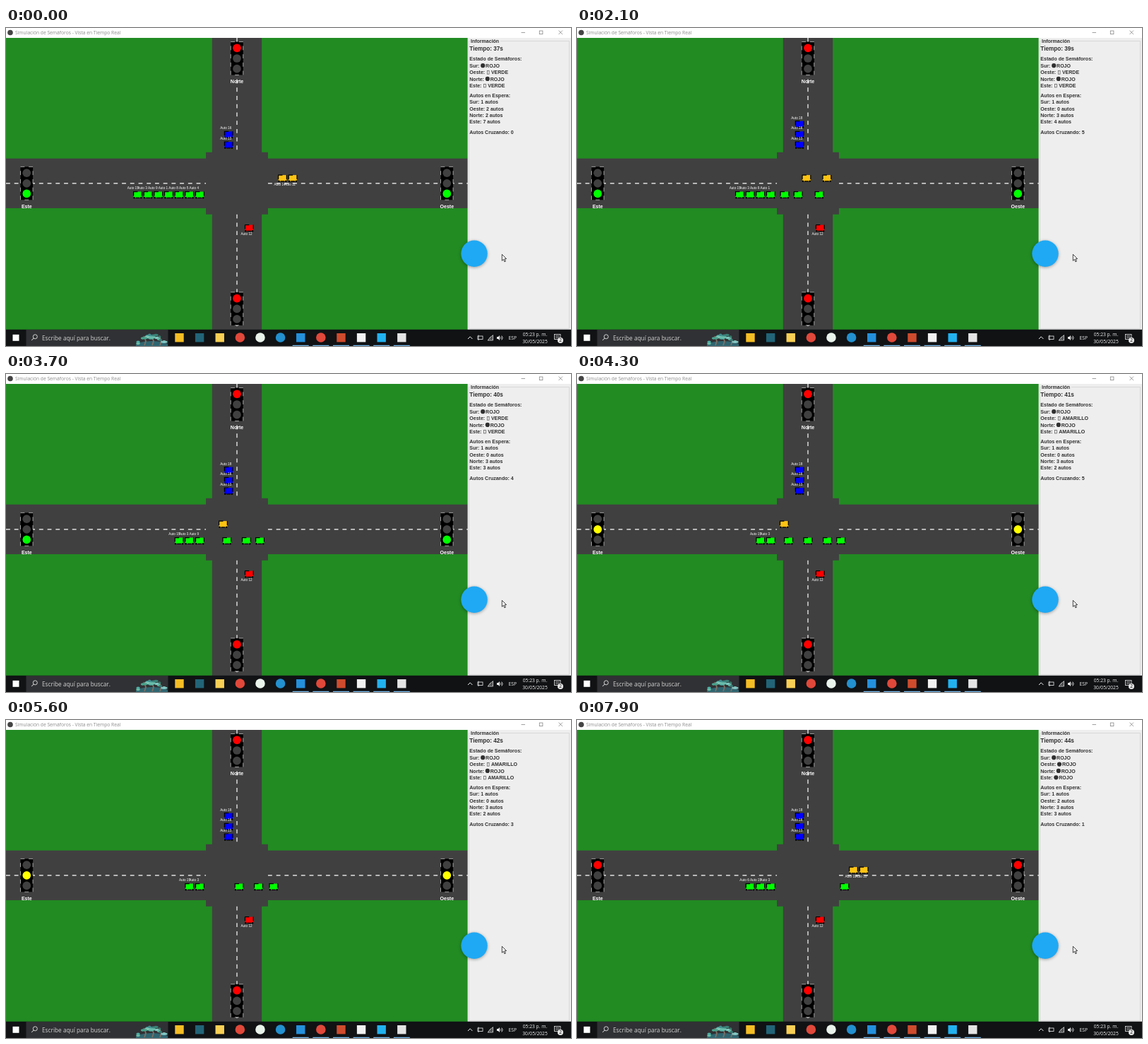
Write an HTML page with a canvas that moves like this. It is 800x450 px and loops after 8 s.

```html
<!DOCTYPE html>
<html lang="es">
<head>
<meta charset="utf-8">
<title>Simulación de Semáforos</title>
<style>
html, body { margin: 0; width: 100%; height: 100%; overflow: hidden; background: #fff; }
canvas { display: block; }
</style>
</head>
<body>
<canvas id="stage" width="800" height="450"></canvas>
<script>
const ctx = document.getElementById('stage').getContext('2d');
const LOOP = 8000, UNIT = 0.586, GAP = 25 * UNIT;
const TOP = 14, BOTTOM = 427, SIDE = 654, CX = 327, CY = 219.8;
const ROAD = 60 * UNIT, BOX = 75 * UNIT;
const SANS = '"Liberation Sans", Arial, sans-serif';
const UI = '"Open Sans", "Noto Sans", sans-serif';
const AMBER_AT = 4, RED_AT = 7.1;
const LAMP = { ROJO: '#f00', AMARILLO: '#ff0', VERDE: '#0f0' };

// x, y: front waiting place; dx, dy: step to the next car behind; lx, ly: label offset.
// ids and since: cars front first, later arrivals by second; leave: departure seconds.
const lanes = {
  Sur: { color: '#f00', x: 344.3, y: 283, dx: 0, dy: GAP, lx: -11.8, ly: 10.2, ids: [12] },
  Oeste: {
    color: '#ffc314', x: 391.5, y: 212.5, dx: GAP, dy: 0, lx: -12, ly: 10.2,
    ids: [14, 11, 19, 10], since: { 19: 5.7, 10: 7.3 }, leave: [.2, 1.2]
  },
  Norte: {
    color: '#00f', x: 315.2, y: 165.4, dx: 0, dy: -GAP, lx: -12, ly: -7.5,
    ids: [13, 16, 18], since: { 18: 1.7 }
  },
  Este: {
    color: '#0f0', x: 274.4, y: 236, dx: -GAP, dy: 0, lx: -14.8, ly: -7.9,
    ids: [4, 5, 8, 1, 9, 3, 15, 6], since: { 6: 7.2 }, leave: [.13, 1.16, 1.82, 2.77, 3.72]
  }
};

// Distance a moving car has covered by second t; traffic slows a little later on.
const travel = t => 29 * Math.min(t, 3.7) + 23.5 * Math.max(0, t - 3.7);
const CROSS = 93, VANISH = 100;

function rect(x, y, w, h, fill) {
  ctx.fillStyle = fill;
  ctx.fillRect(x, y, w, h);
}

// Rectangle around the crossing, given half sizes.
function middle(halfW, halfH, fill) {
  rect(CX - halfW, CY - halfH, 2 * halfW, 2 * halfH, fill);
}

function frameRect(x, y, w, h, color, width) {
  ctx.strokeStyle = color;
  ctx.lineWidth = width;
  ctx.strokeRect(x, y, w, h);
}

function disc(x, y, r, fill, ry = r) {
  ctx.fillStyle = fill;
  ctx.beginPath();
  ctx.ellipse(x, y, r, ry, 0, 0, 7);
  ctx.fill();
}

function arc(x, y, r, color, from = 0, to = 7) {
  ctx.strokeStyle = color;
  ctx.lineWidth = .9;
  ctx.beginPath();
  ctx.arc(x, y, r, from, to);
  ctx.stroke();
}

function trace(points) {
  ctx.beginPath();
  for (let i = 0; i < points.length; i += 2) ctx.lineTo(points[i], points[i + 1]);
}

function line(points, color, width = 1) {
  trace(points);
  ctx.strokeStyle = color;
  ctx.lineWidth = width;
  ctx.stroke();
}

function shape(points, fill) {
  trace(points);
  ctx.fillStyle = fill;
  ctx.fill();
}

function text(s, x, y, font, color, align = 'left') {
  ctx.font = font;
  ctx.fillStyle = color;
  ctx.textAlign = align;
  ctx.fillText(s, x, y);
}

const bold = size => `bold ${size}px ${SANS}`;
const plain = size => `${size}px ${SANS}`;
const ui = size => `${size}px ${UI}`;

function dashed(draw) {
  ctx.setLineDash([10 * UNIT, 10 * UNIT]);
  draw();
  ctx.setLineDash([]);
}

function car(x, y, color) {
  const w = 20 * UNIT, h = 15 * UNIT;
  rect(x - w / 2, y - h / 2, w, h, color);
  dashed(() => frameRect(x - w / 2, y - h / 2, w, h, '#000', 1.2));
  for (const side of [-5, 4.8]) disc(x + side, y + 4.3, 1.2, '#000');
}

function roads() {
  rect(0, TOP, SIDE, BOTTOM - TOP, '#228b22');
  rect(CX - ROAD, TOP, 2 * ROAD, BOTTOM - TOP, '#404040');
  rect(0, CY - ROAD, SIDE, 2 * ROAD, '#404040');
  middle(BOX, BOX, '#404040');
  dashed(() => {
    line([0, CY, CX - BOX, CY], '#fff', 1.2);
    line([CX + BOX, CY, SIDE, CY], '#fff', 1.2);
    line([CX, TOP, CX, CY - BOX], '#fff', 1.2);
    line([CX, CY + BOX, CX, BOTTOM], '#fff', 1.2);
  });
}

function signal(x, y, state, label) {
  const w = 30 * UNIT, h = 80 * UNIT;
  rect(x - w / 2, y - h / 2, w, h, '#000');
  dashed(() => frameRect(x - w / 2, y - h / 2, w, h, '#c4c4c4', .8));
  Object.keys(LAMP).forEach((name, i) =>
    disc(x, y + (i - 1) * GAP, 10 * UNIT, name === state ? LAMP[name] : '#404040'));
  if (label) text(label, x, y + 34.8, bold(12 * UNIT), '#fff', 'center');
}

function traffic(t) {
  const waiting = {};
  let crossing = 0;
  for (const [name, lane] of Object.entries(lanes)) {
    const { x, y, dx, dy, lx, ly, color, ids, since = {}, leave = [] } = lane;
    const left = leave.filter(d => t >= d);
    const queue = ids.filter(id => t >= (since[id] || 0)).slice(left.length);
    waiting[name] = queue.length;
    queue.forEach((id, i) => car(x + dx * i, y + dy * i, color));
    queue.forEach((id, i) =>
      text('Auto ' + id, x + dx * i + lx, y + dy * i + ly, plain(8 * UNIT), '#fff'));
    const dir = -Math.sign(dx);
    for (const d of left) {
      const run = travel(t) - travel(d);
      if (run > VANISH) continue;
      crossing++;
      car(x + dir * (11.5 + Math.min(run, CROSS)), y, color);
    }
  }
  return { waiting, crossing };
}

function panel(t, states, counts) {
  const ink = '#303030', font = bold(12 * UNIT), left = 656.3, step = 16 * UNIT;
  rect(SIDE - .4, TOP, 800 - SIDE + .4, BOTTOM - TOP, '#eee');
  line([657, 18.5, 655.5, 18.5, 655.5, 425.5, 797.5, 425.5, 797.5, 18.5, 700, 18.5], '#cfcfcf', .7);
  text('Información', 658, 21.2, font, ink);
  text(`Tiempo: ${37 + Math.floor(t)}s`, left, 31.8, bold(14 * UNIT), ink);
  text('Estado de Semáforos:', left, 46.4, font, ink);
  text('Autos en Espera:', left, 98, font, ink);
  Object.keys(lanes).forEach((name, i) => {
    const y = 55.8 + i * step, head = name + ': ', state = states[name];
    text(head, left, y, font, ink);
    const x = left + ctx.measureText(head).width;
    if (state === 'ROJO') disc(x + 2.9, y - 2.6, 3.1, ink);
    else frameRect(x + 1.2, y - 4.6, 2.8, 4.6, '#555', .7);
    text(state, x + 6.8, y, font, ink);
    text(`${head}${counts.waiting[name]} autos`, left, y + 51.5, font, ink);
  });
  text('Autos Cruzando: ' + counts.crossing, left, 149.5, font, ink);
}

function titleBar() {
  const gray = '#888';
  rect(0, 0, 800, TOP, '#fff');
  disc(6, 6.5, 3.8, '#444');
  text('Simulación de Semáforos - Vista en Tiempo Real', 13, 9.4, ui(6.7), '#8c8c8c');
  line([729.5, 6.5, 735, 6.5], gray, .8);
  frameRect(755.3, 4, 4.6, 4.6, gray, .8);
  line([782.5, 3.5, 788, 9], gray, .8);
  line([788, 3.5, 782.5, 9], gray, .8);
}

function floatingButton() {
  ctx.save();
  ctx.shadowColor = 'rgba(0,0,0,.35)';
  ctx.shadowBlur = 4;
  ctx.shadowOffsetY = 1;
  disc(663, 319.3, 18.7, '#1fa9f4');
  ctx.restore();
}

function pointer() {
  ctx.save();
  ctx.translate(702.3, 320.3);
  const p = [0, 0, 0, 9, 2.1, 7, 3.6, 10.5, 5.1, 9.8, 3.6, 6.5, 6.3, 6.3, 0, 0];
  shape(p, '#fff');
  line(p, '#111', .8);
  ctx.restore();
}

// Small landscape in the search box: layered tree crowns over water.
function scenery() {
  let seed = 7;
  const rnd = () => (seed = seed * 16807 % 2147483647) / 2147483647;
  ctx.save();
  ctx.beginPath();
  ctx.rect(184, 428, 45, 22);
  ctx.clip();
  disc(207, 450, 24, '#2f6570', 7);
  for (const x of [196, 207, 218]) line([x, 449, x + 2, 443, x - 1, 436], '#7d7064', 1.8);
  for (let i = 0; i < 22; i++) {
    const u = rnd() * 2 - 1;
    disc(207 + 20 * u, 433 + 7 * u * u + 7 * rnd(), 2 + 3 * rnd(),
      `hsl(${158 + 22 * rnd()} 38% ${32 + 36 * rnd()}%)`, 1.7);
  }
  ctx.restore();
}

function tray() {
  const ink = '#eee';
  line([654, 440, 657.2, 436.8, 660.4, 440], ink);
  frameRect(668, 436, 7, 4.5, ink, .8);
  line([669, 434.5, 669, 442], ink, .8);
  line([682, 442, 689.5, 434.5, 689.5, 442, 682, 442], ink, .7);
  for (let r = 2; r < 8; r += 2) arc(689.5, 442, r, '#aaa', Math.PI, Math.PI * 1.5);
  shape([695, 437, 697, 437, 699, 435, 699, 442, 697, 440, 695, 440], ink);
  for (const r of [2, 4]) arc(699, 438.5, r, ink, -.8, .8);
  text('ESP', 711.5, 441, ui(6.7), ink);
  text('05:23 p. m.', 749, 436.3, ui(6.7), ink, 'center');
  text('30/05/2025', 749, 446.2, ui(6.7), ink, 'center');
  frameRect(776.5, 433.5, 8.5, 7, ink, .8);
  for (const y of [435.7, 438]) line([778, y, 783.5, y], ink, .7);
  disc(785, 442, 4, '#e8e8e8');
  text('2', 785, 444.4, ui(6.5), '#111', 'center');
}

function taskbar() {
  rect(0, BOTTOM - .3, 800, 24, '#101214');
  rect(28.5, BOTTOM, 201, 23, '#303134');
  rect(9.5, 433.8, 9, 9, '#fff');
  arc(41.3, 436.8, 3, '#e4e4e4');
  line([39.2, 439, 36.2, 442], '#e4e4e4');
  text('Escribe aquí para buscar.', 51, 441.8, ui(8.3), '#d2d2d2');
  scenery();
  const round = ['#e0483a', '#e9f3eb', '#2390cf'];
  const icons = ['#f5bd24', '#226478', '#f8cf55', ...round,
    '#2490dc', round[0], '#cf4b2d', '#f2f2f2', '#22b1ef', '#e4e4e4'];
  icons.forEach((color, i) => {
    const x = 245.5 + i * 28.62;
    if (round.includes(color)) disc(x, 438, 6.8, color);
    else rect(x - 6.2, 432, 12.4, 12.4, color);
    if (i > 5) rect(x - 11.5, 448.8, 23, 1.2, '#76b9ed');
  });
  tray();
}

function render(t) {
  const side = t < AMBER_AT ? 'VERDE' : t < RED_AT ? 'AMARILLO' : 'ROJO';
  const states = { Sur: 'ROJO', Oeste: side, Norte: 'ROJO', Este: side };
  roads();
  signal(CX, 43, states.Norte, 'Norte');
  signal(CX, 397.3, states.Sur);
  signal(29.3, CY, side, 'Este');
  signal(624.3, CY, side, 'Oeste');
  const counts = traffic(t);
  titleBar();
  panel(t, states, counts);
  floatingButton();
  pointer();
  taskbar();
}

const start = performance.now();
function frame() {
  // The picture advances in tenths of a second.
  const ms = (performance.now() - start) % LOOP;
  render(Math.floor(ms / 100) / 10);
  requestAnimationFrame(frame);
}
frame();
</script>
</body>
</html>
```
